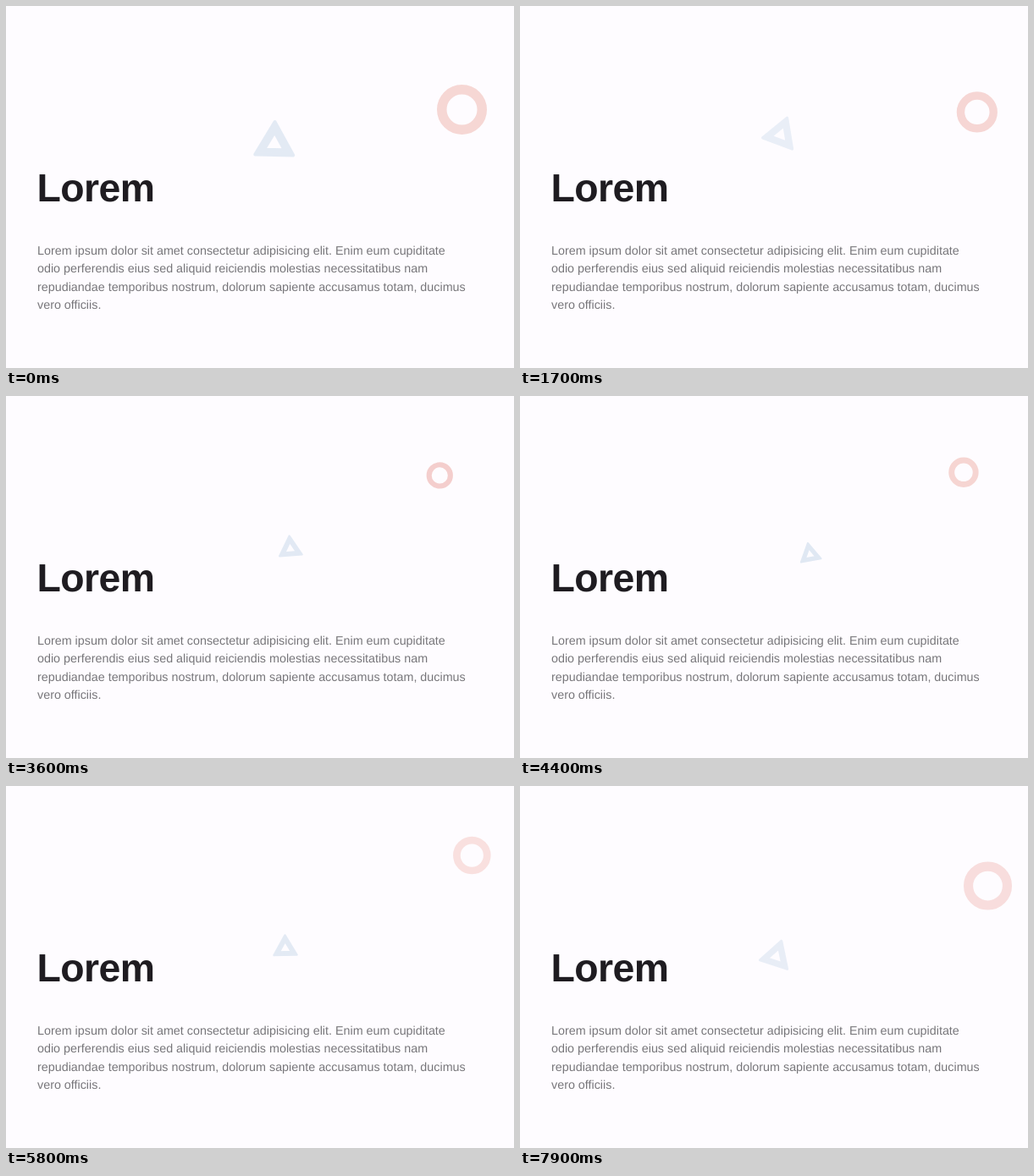
Recreate the animation shown at these times as an HTML page. Size 600 px wide and 428 px high, loop 8 s.

```html
<!DOCTYPE html>
<html lang="la">
<head>
<meta charset="utf-8">
<title>Lorem</title>
<style>
  html, body { margin: 0; width: 100%; height: 100%; overflow: hidden; background: #fefcff; }
  svg { display: block; width: 600px; height: 428px; }
  text { font-family: "Liberation Sans", Arial, sans-serif; text-rendering: geometricPrecision; }
  .title { font-weight: bold; font-size: 46.4px; letter-spacing: -.6px; fill: #1f1c21; }
  .body { font-size: 14.33px; fill: #77767a; }
  #ring { fill: none; stroke: #eaa098; stroke-width: 11.5; }
  #tri { fill: #c2d4e8; stroke: #c2d4e8; stroke-width: 4; stroke-linejoin: round; fill-rule: evenodd; }
</style>
</head>
<body>
<svg viewBox="0 0 600 428">
  <circle id="ring" r="23.75"/>
  <path id="tri" d="M0-26L22.5 13H-22.5ZM0-14L12.1 7H-12.1Z"/>
  <text class="title" x="36.5" y="231">Lorem</text>
  <text class="body" y="294">
    <tspan x="37">Lorem ipsum dolor sit amet consectetur adipisicing elit. Enim eum cupiditate</tspan>
    <tspan x="37" dy="1.5em">odio perferendis eius sed aliquid reiciendis molestias necessitatibus nam</tspan>
    <tspan x="37" dy="1.5em">repudiandae temporibus nostrum, dolorum sapiente accusamus totam, ducimus</tspan>
    <tspan x="37" dy="1.5em">vero officiis.</tspan>
  </text>
</svg>
<script>
const LOOP = 8000, STEP = 100;

// Turning points of each drift; sizes are outer widths in pixels
const ringPoses = [
  { at: 0, x: 538.5, y: 122.5, size: 59, alpha: .41 },
  { at: 1300, x: 543.8, y: 129.5, size: 50.5, alpha: .41 },
  { at: 3100, x: 510, y: 94.6, size: 30.5, alpha: .5 },
  { at: 6600, x: 556, y: 80.3, size: 46.5, alpha: .28 },
  { at: 8200, x: 552.2, y: 121.5, size: 58, alpha: .34 }
];
const triPoses = [
  { at: 0, x: 317, y: 163, size: 49, angle: 1.2 },
  { at: 1500, x: 307.5, y: 152, size: 40.7, angle: 21 },
  { at: 4450, x: 342.5, y: 187.5, size: 26, angle: -10.5 },
  { at: 8000, x: 302.5, y: 201.8, size: 37, angle: 18.3 }
];

// Sine easing from one turning point to the next
function poseAt(poses, t) {
  const i = poses.findIndex(p => p.at > t);
  const a = poses[i - 1], b = poses[i];
  const e = (1 - Math.cos(Math.PI * (t - a.at) / (b.at - a.at))) / 2;
  const pose = {};
  for (const k in a) pose[k] = a[k] + (b[k] - a[k]) * e;
  return pose;
}

function place(id, { x, y, size, angle = 0 }, unit, alpha) {
  const el = document.getElementById(id);
  el.setAttribute("transform", `translate(${x} ${y}) rotate(${angle}) scale(${size / unit})`);
  el.setAttribute("opacity", alpha);
}

function draw() {
  const t = Math.floor(performance.now() % LOOP / STEP) * STEP;
  const ring = poseAt(ringPoses, t), tri = poseAt(triPoses, t);
  place("ring", ring, 59, ring.alpha);
  place("tri", tri, 49, .44 - .005 * tri.angle);
  requestAnimationFrame(draw);
}
draw();
</script>
</body>
</html>
```
